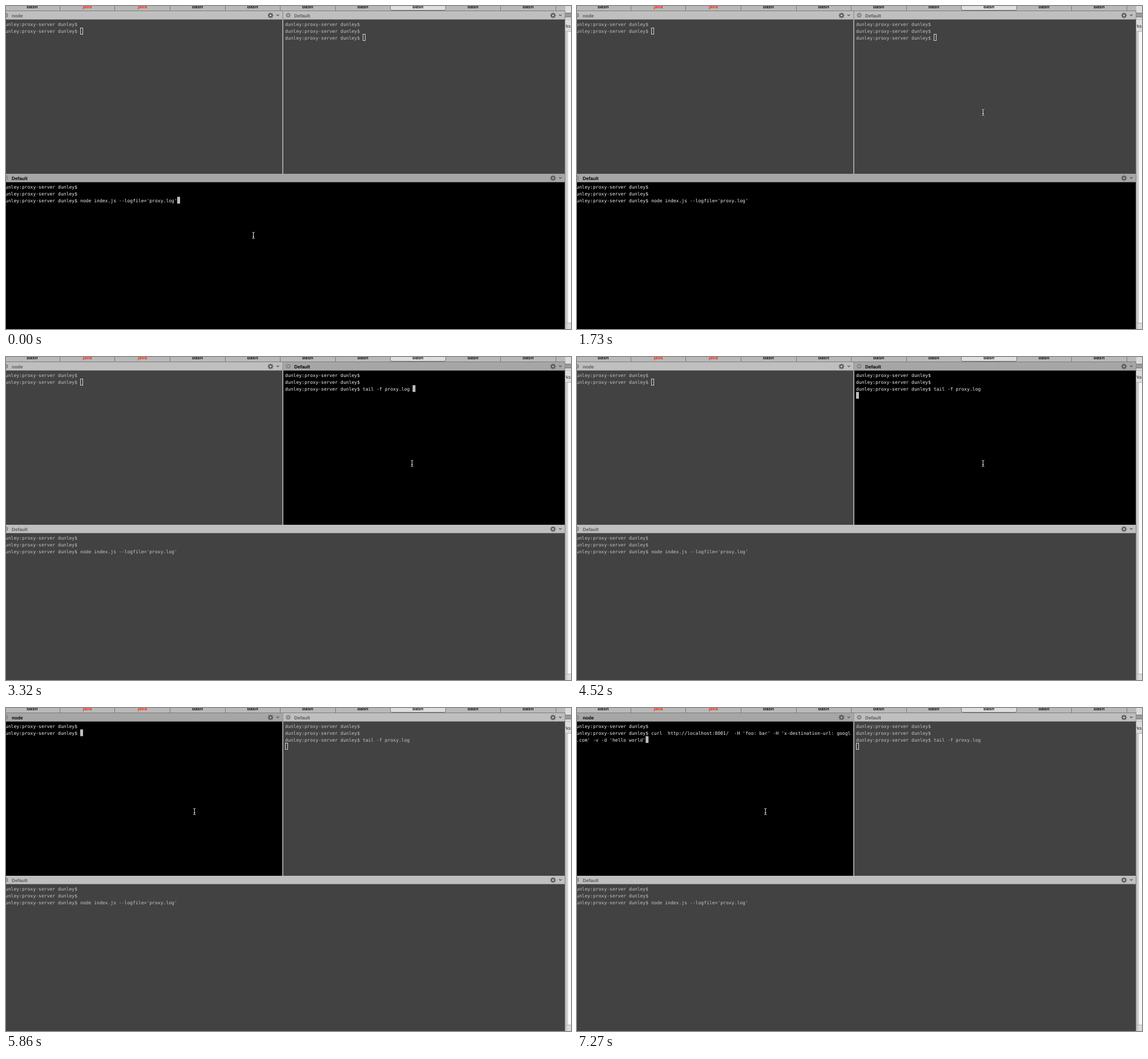
An HTML page with a canvas for the animation above (8 s loop, 990x566 px).

```html
<!DOCTYPE html>
<html lang="en">
<head>
<meta charset="utf-8">
<title>Terminal panes</title>
<style>
html, body { margin: 0; width: 100%; height: 100%; overflow: hidden; background: #000; }
canvas { display: block; }
</style>
</head>
<body>
<canvas id="stage" width="990" height="566"></canvas>
<script>
const ctx = document.getElementById('stage').getContext('2d');
const LOOP = 8000, CELL = 4.857, LINE = 11.85;
const MONO = '8.07px "DejaVu Sans Mono", monospace';
const BOLD = 'bold 8.2px "Liberation Sans", Arial, sans-serif';
const PROMPT = 'dunley:proxy-server dunley$ ';
const TAIL = 'tail -f proxy.log ';
const CURL = "curl  http://localhost:8001/  -H 'foo: bar' -H 'x-destination-url: googl";

// Each list holds [start time, value]; the last entry reached applies.
const pointerSteps = [
  [0, [433.5, 402]], [1280, [440.5, 395]], [1430, [640.5, 268]], [1580, [668.5, 241]],
  [1730, [711.5, 186.5]], [5110, [667.5, 171]], [5260, [358.5, 180]], [5410, [330.2, 181.5]]
];
const focusSteps = [[0, 'bottom'], [2030, 'right'], [5860, 'left']];
const tabSteps = [[0, 'bash'], [4960, 'tail'], [5860, 'bash']];
const rightSteps = [[0, ['']], [2930, ['clear']], [3320, [TAIL]], [4520, [TAIL, '']]];
const leftSteps = [[0, ['']], [6760, ['clear']], [7270, [CURL, "e.com' -v -d 'hello world'"]]];

const at = (steps, t) => steps.filter(s => s[0] <= t).pop()[1];

function rect(x, y, w, h, color) {
  ctx.fillStyle = color;
  ctx.fillRect(x, y, w, h);
}

function text(str, x, y, color, font, align = 'left') {
  ctx.font = font;
  ctx.textAlign = align;
  ctx.fillStyle = color;
  ctx.fillText(str, x, y);
}

function stroke(color, width, path) {
  ctx.strokeStyle = color;
  ctx.lineWidth = width;
  ctx.beginPath();
  path();
  ctx.stroke();
}

function line(color, width, ...points) {
  stroke(color, width, () => points.forEach(p => ctx.lineTo(...p)));
}

function gear(x, y) {
  stroke('#555', 1.7, () => ctx.arc(x, y, 2.7, 0, 7));
  for (let i = 0; i < 8; i++) {
    const c = Math.cos(i * Math.PI / 4), s = Math.sin(i * Math.PI / 4);
    line('#555', 1.5, [x + 3 * c, y + 3 * s], [x + 5 * c, y + 5 * s]);
  }
}

function closeIcon(x, y) {
  ctx.fillStyle = '#858585';
  ctx.beginPath();
  ctx.arc(x, y, 4, 0, 7);
  ctx.fill();
  line('#d0d0d0', 1, [x - 1.6, y - 1.6], [x + 1.6, y + 1.6]);
  line('#d0d0d0', 1, [x + 1.6, y - 1.6], [x - 1.6, y + 1.6]);
}

function pane(p, active, cursorOn) {
  const { x, y, w, h, title, textX } = p;
  rect(x, y, w, h, active ? '#000' : '#424242');
  rect(x, y, w, 15, active ? '#a6a6a6' : '#bfbfbf');
  rect(x, y + 14, w, 1, active ? '#777' : '#8c8c8c');
  closeIcon(textX + 5.5, y + 7.2);
  text(title, textX + 16, y + 10.6, active ? '#000' : '#5c5c5c', BOLD);
  const right = x + w;
  gear(right - 20.5, y + 7.5);
  line('#555', 1.2, [right - 10, y + 6], [right - 7.8, y + 8.2], [right - 5.6, y + 6]);

  const color = active ? '#f0f0f0' : '#c4c4c4';
  p.lines.forEach((s, i) => text(s, textX, y + 26 + i * LINE, color, MONO));
  if (!cursorOn) return;
  const last = p.lines.length - 1;
  const cx = textX + p.lines[last].length * CELL, cy = y + 16.7 + last * LINE;
  if (active) rect(cx, cy, 5, 11.8, '#bfbfbf');
  else {
    ctx.strokeStyle = '#d4d4d4';
    ctx.lineWidth = 1;
    ctx.strokeRect(Math.round(cx) + .5, Math.round(cy) + .5, 4, 11);
  }
}

function tabs(selected) {
  rect(0, 0, 980, 9, '#b9b9b9');
  rect(0, 8, 980, 1, '#7c7c7c');
  for (let i = 0; i < 10; i++) {
    const mid = 45.9 + i * 96.55, java = i === 1 || i === 2;
    if (i === 7) {
      ctx.fillStyle = '#dedede';
      ctx.beginPath();
      ctx.roundRect(673.5, -6, 97, 13.5, 3);
      ctx.fill();
      stroke('#707070', 1, () => ctx.roundRect(673.5, -6, 97, 13.5, 3));
    } else if (i !== 6) {
      rect(Math.round(mid + 48), 0, 1, 8, '#777');
    }
    text(i === 7 ? selected : java ? 'java' : 'bash', mid, i === 7 ? 3.6 : 4.4,
      java ? '#ff2a12' : '#111', BOLD, 'center');
  }
}

// Sliver of the window behind the terminal
function backdrop() {
  rect(979, 0, 11, 566, '#dcdcdc');
  for (let i = 0; i < 3; i++) rect(980, 12 + i * 3, 10, 1.5, '#555');
  rect(979, 23, 11, 1, '#b5b5b5');
  text('rks', 978.5, 37.5, '#222', '8px "Liberation Sans", Arial, sans-serif');
  rect(979, 44, 11, 1, '#b0b0b0');
  rect(985, 45, 5, 510, '#fafafa');
  const shade = ctx.createLinearGradient(979, 0, 986, 0);
  shade.addColorStop(0, '#b4b4b4');
  shade.addColorStop(1, '#e2e2e2');
  rect(979, 45, 6, 521, shade);
  rect(979, 555, 11, 1, '#b0b0b0');
}

function pointer([x, y]) {
  const beam = () => {
    ctx.moveTo(x - 2, y - 5.5);
    ctx.quadraticCurveTo(x, y - 5.5, x, y - 4);
    ctx.lineTo(x, y + 4);
    ctx.quadraticCurveTo(x, y + 5.5, x - 2, y + 5.5);
    ctx.moveTo(x + 2, y - 5.5);
    ctx.quadraticCurveTo(x, y - 5.5, x, y - 4);
    ctx.moveTo(x, y + 4);
    ctx.quadraticCurveTo(x, y + 5.5, x + 2, y + 5.5);
    ctx.moveTo(x - 1.3, y + 2);
    ctx.lineTo(x + 1.3, y + 2);
  };
  stroke('rgba(0,0,0,.35)', 2, beam);
  stroke('#e8e8e8', 1, beam);
}

function draw(t) {
  const focus = at(focusSteps, t);
  const typed = steps => {
    const [first, ...rest] = at(steps, t);
    return [PROMPT + first, ...rest];
  };
  backdrop();
  tabs(at(tabSteps, t));
  pane({ x: 0, y: 9, w: 484, h: 285, title: 'node', textX: -6,
    lines: [PROMPT, ...typed(leftSteps)] }, focus === 'left', true);
  pane({ x: 486, y: 9, w: 493, h: 285, title: 'Default', textX: 489,
    lines: [PROMPT, PROMPT, ...typed(rightSteps)] }, focus === 'right', true);
  rect(484, 9, 2, 285, '#a0a0a0');
  pane({ x: 0, y: 294, w: 979, h: 272, title: 'Default', textX: -6,
    lines: [PROMPT, PROMPT, PROMPT + "node index.js --logfile='proxy.log'"] },
    focus === 'bottom', t < 450);
  rect(979, 9, 1, 557, '#8a8a8a');
  pointer(at(pointerSteps, t));
}

ctx.textRendering = 'geometricPrecision';
const start = performance.now();
function tick() {
  draw((performance.now() - start) % LOOP);
  requestAnimationFrame(tick);
}
tick();
</script>
</body>
</html>
```
